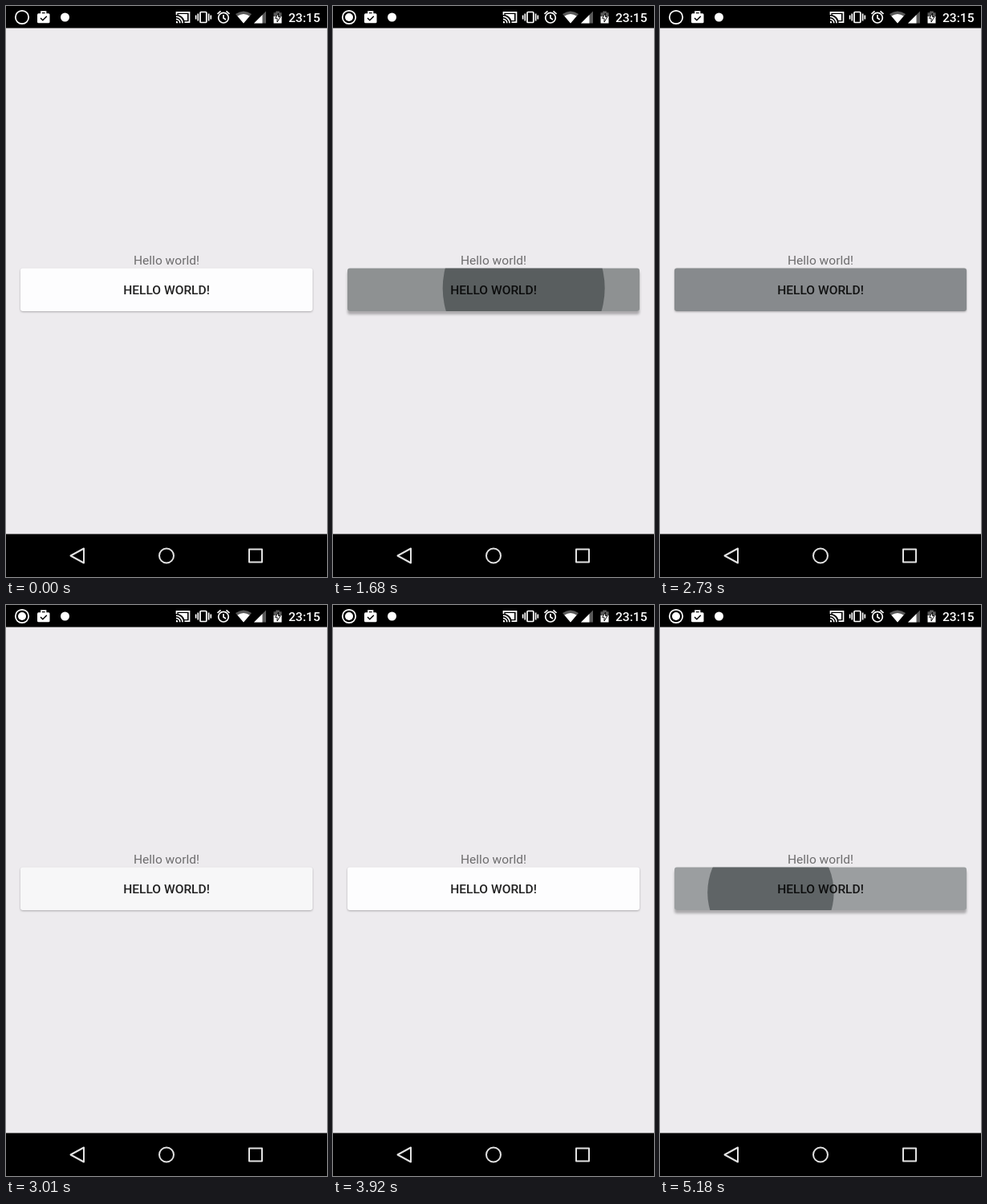
Write an HTML page that moves like this. It is 400 px wide and 711 px high and loops after 5250 ms.

```html
<!DOCTYPE html>
<html lang="en">
<head>
<meta charset="utf-8">
<title>Button ripple</title>
<style>
  html, body { margin: 0; width: 100%; height: 100%; overflow: hidden; background: #edebee; }
  svg { display: block; width: 400px; height: 711px; font-family: Roboto, sans-serif; font-size: 15.56px; }
  .medium { font-weight: 500; }
  .line { fill: none; stroke: #fff; stroke-width: 1.7; }
  .nav { fill: none; stroke: #e2e2e2; stroke-width: 2; stroke-linejoin: round; }
  .dim { opacity: .35; }
</style>
</head>
<body>
<svg viewBox="0 0 400 711">
  <defs>
    <clipPath id="buttonShape"><rect x="18" y="326.5" width="364" height="53.5" rx="3"/></clipPath>
  </defs>
  <rect width="400" height="711" fill="#edebee"/>
  <rect width="400" height="27.5" fill="#000"/>
  <rect y="657.5" width="400" height="53.5" fill="#000"/>

  <!-- status bar -->
  <g fill="#fff">
    <circle class="line" cx="20" cy="14" r="8.2"/>
    <circle id="recordDot" cx="20" cy="14" r="5"/>
    <rect x="39" y="9.3" width="15.5" height="12" rx="1.5"/>
    <path class="line" d="M44 10V7.2h5.5V10"/>
    <path d="M43 15l2.8 2.8 5-5" fill="none" stroke="#000" stroke-width="1.5"/>
    <circle cx="73.5" cy="14" r="5.5"/>

    <path class="line" d="M212.5 11V7.8h16v12.4h-6"/>
    <path class="line" d="M212 13.2a8 8 0 0 1 8 8M212 16.4a4.8 4.8 0 0 1 4.8 4.8"/>
    <path d="M212 18.8a2.4 2.4 0 0 1 2.4 2.4H212z"/>
    <path d="M215 10h11v8h-3.500a11 11 0 0 0-8-7z"/>

    <rect class="line" x="242" y="7.5" width="7.800" height="13" rx="1"/>
    <path class="line" d="M239.300 9.500v9M236.600 11.500v5M252.600 9.500v9M255.300 11.500v5"/>

    <circle class="line" cx="271" cy="14.7" r="6.300"/>
    <path class="line" d="M271 11v4l3 2M263.500 9.800l4-3.400M278.500 9.800l-4-3.400"/>

    <path class="dim" d="M286 10q10-7 20 0l-10 11.500z"/>
    <path d="M288.300 12.500q7.700-5 15.400 0L296 21.500z"/>
    <path class="dim" d="M324 6.500v15h-15z"/>
    <path d="M319.500 11v10.500H309z"/>

    <path class="dim" d="M333.500 8.300h2.700V6.500h4.600v1.800h2.700V14h-10z"/>
    <path d="M333.500 13h10v8.500h-10z"/>
    <path d="M339.500 9l-4 6.300h2.500V20l4-6.500h-2.500z" stroke="#000" stroke-width=".9"/>
    <text class="medium" x="391.500" y="20" text-anchor="end">23:15</text>
  </g>

  <!-- content -->
  <text x="200" y="322" text-anchor="middle" fill="#000" fill-opacity=".54">Hello world!</text>
  <rect id="button" x="18" y="326.5" width="364" height="53.5" rx="3" fill="#fdfdfe"/>
  <g clip-path="url(#buttonShape)" fill="#2a3033">
    <rect id="tint" x="18" y="326" width="364" height="55"/>
    <circle id="wave"/>
  </g>
  <text class="medium" x="200" y="359.300" text-anchor="middle" fill="#000" fill-opacity=".87">HELLO WORLD!</text>

  <!-- navigation bar -->
  <g class="nav">
    <path d="M80.500 684.500L97 675.500v18z"/>
    <circle cx="200" cy="684.500" r="9"/>
    <rect x="303" y="676.500" width="16" height="16"/>
  </g>
</svg>
<script>
  const LOOP = 5250;
  const CENTER = { x: 200, y: 353.3 }, FULL_RADIUS = 184;
  const STRENGTH = 0.527;
  const DOT_TOGGLES = [350, 1960, 2940, 3990, 4970];

  // Times in ms: tint and wave begin separately; release fades both out.
  const presses = [
    { x: 283.5, y: 349, lift: 870, tint: 880, rise: 750, peak: STRENGTH,
      wave: 995, enter: 1250, power: 1, release: 2500, fade: 520 },
    { x: 78, y: 347, lift: 3510, tint: 3540, rise: 50, peak: 0.37,
      wave: 3555, enter: 260, power: 2.4, release: 3510, fade: 385 },
    { x: 91.5, y: 361.5, lift: 4400, tint: 4520, rise: 750, peak: STRENGTH,
      wave: 4612, enter: 1330, power: 1, release: LOOP, fade: 520 }
  ];

  const [button, tint, wave, recordDot] =
    ['button', 'tint', 'wave', 'recordDot'].map(id => document.getElementById(id));
  const progress = (t, start, duration) => Math.min(1, Math.max(0, (t - start) / duration));
  const mix = (a, b, k) => a + (b - a) * k;

  function setAttributes(element, values) {
    for (const name in values) element.setAttribute(name, values[name]);
  }

  function draw(t) {
    const press = presses.findLast(p => t >= p.lift) || presses[0];
    const visible = 1 - progress(t, press.release, press.fade) ** 1.25;
    const spread = 1 - (1 - progress(t, press.wave, press.enter)) ** press.power;
    const lift = progress(t, press.lift, 250) * (1 - progress(t, press.release, 200));

    setAttributes(tint, { opacity: press.peak * progress(t, press.tint, press.rise) * visible });
    setAttributes(wave, {
      cx: mix(press.x, CENTER.x, spread),
      cy: mix(press.y, CENTER.y, spread),
      r: FULL_RADIUS * spread * (spread === 1 ? 1.02 : 1),
      opacity: STRENGTH * visible
    });
    button.style.filter =
      `drop-shadow(0 ${mix(1.5, 4, lift)}px ${mix(0.8, 1.5, lift)}px rgba(0,0,0,.28))`;

    const toggles = DOT_TOGGLES.filter(time => t >= time).length;
    recordDot.style.visibility = toggles % 2 ? 'visible' : 'hidden';
  }

  const started = performance.now();
  function tick() {
    draw((performance.now() - started) % LOOP);
    requestAnimationFrame(tick);
  }
  tick();
</script>
</body>
</html>
```
